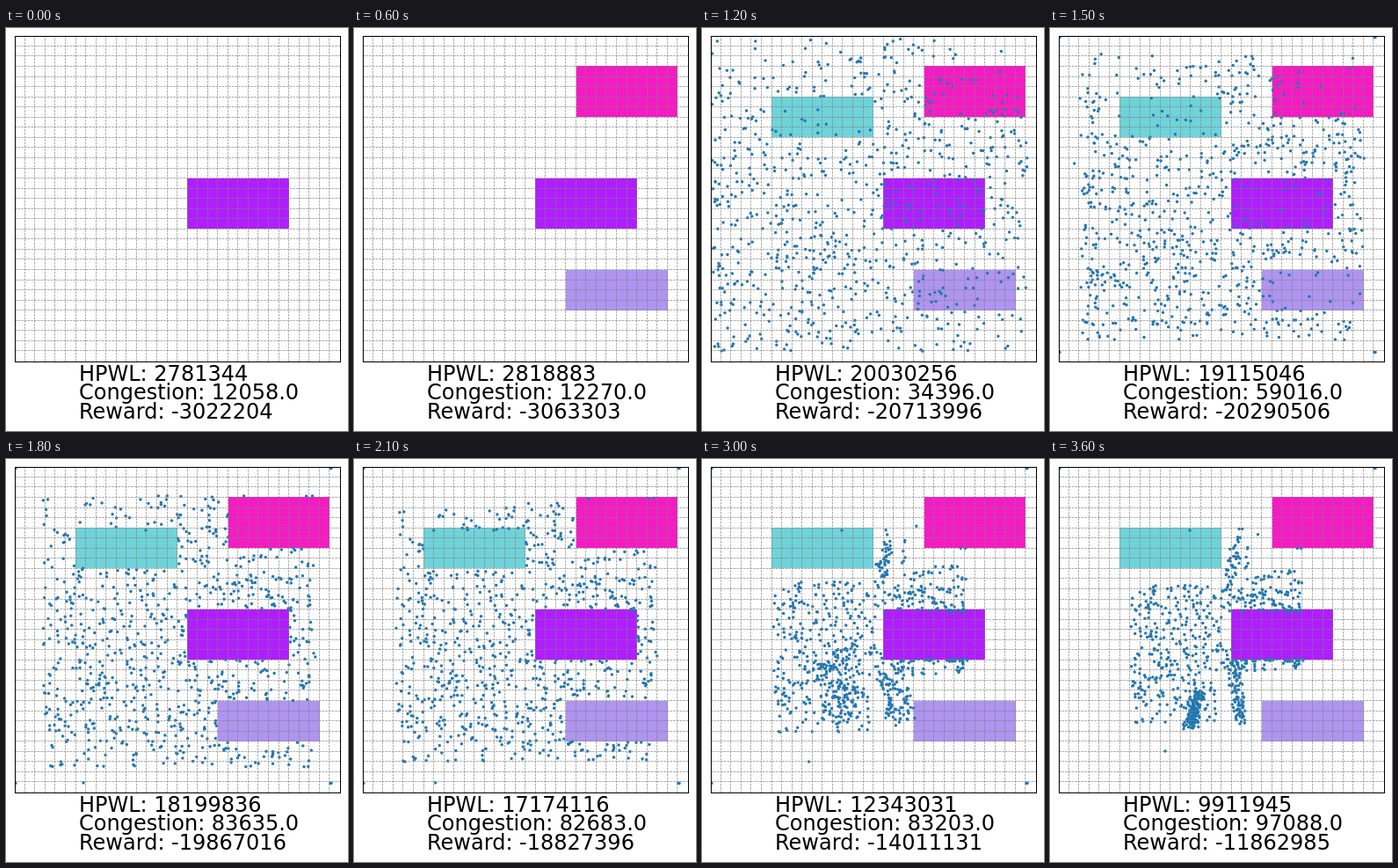
These frames come from a looping animation (389x458 px, 3.9 s). An HTML page:

```html
<!DOCTYPE html>
<html lang="en">
<head>
<meta charset="utf-8">
<title>Chip placement</title>
<style>
  html, body { margin: 0; width: 100%; height: 100%; overflow: hidden; background: #fff; }
  svg { display: block; }
  text { font: 24px "DejaVu Sans", Verdana, sans-serif; white-space: pre; }
</style>
</head>
<body>
<svg width="389" height="458" viewBox="0 0 389 458">
  <clipPath id="area"><rect x="10" y="9" width="371" height="371"/></clipPath>
  <g id="macros" shape-rendering="crispEdges"></g>
  <path id="cells" fill="none" stroke="#1f77b4" stroke-width="3.5" stroke-linecap="round" clip-path="url(#area)"/>
  <path id="grid" fill="none" stroke="#808080" stroke-width=".69" stroke-dasharray="2.57 1.11"/>
  <rect x="10.5" y="9.5" width="370" height="370" fill="none" stroke="#000"/>
  <text x="83" y="401"></text>
  <text x="83" y="422"></text>
  <text x="83" y="444"></text>
</svg>
<script>
const STEP = 300;
const STEPS = 13;
const PITCH = 11.552;
const mix = (a, b, t) => a + (b - a) * t;
const colX = i => Math.round(10.1 + i * PITCH);
const rowY = i => Math.round(8.84 + i * PITCH);

// HPWL, congestion, reward at every second step; steps between take the mean
const stats = [
  [2781344, 12058, -3022204],
  [2818883, 12270, -3063303],
  [20030256, 34396, -20713996],
  [18199836, 83635, -19867016],
  [16148396, 81731, -17787777],
  [12343031, 83203, -14011131],
  [9911945, 97088, -11862985]
];
function statsAt(step) {
  const a = stats[Math.floor(step / 2)], b = stats[Math.ceil(step / 2)];
  return a.map((v, i) => Math.round((v + b[i]) / 2));
}

// Column, row and height in grid units; listed in order of placement
const macros = [
  [17, 14, 5, '#b01eff'],
  [20, 23, 4, '#af94f0'],
  [21, 3, 5, '#f41bc3'],
  [6, 6, 4, '#6fd3d9']
].map(([c, r, h, fill]) => ({
  x0: colX(c), y0: rowY(r), x1: colX(c + 10), y1: rowY(r + h), fill
}));
const macroAt = (x, y) =>
  macros.find(m => x > m.x0 && x < m.x1 && y > m.y0 && y < m.y1);

// Dense streaks in which part of the cells end up
const corner = { x: 164, y: 285, rx: 12, ry: 22, slant: 8 };
const upper = { x: 209, y: 115, rx: 9, ry: 36, slant: 16 };
const lower = { x: 212, y: 264, rx: 9, ry: 37, slant: -8 };

let seed = 20417;
function rnd() {
  seed = seed + 0x6D2B79F5 | 0;
  let t = Math.imul(seed ^ seed >>> 15, 1 | seed);
  t = t + Math.imul(t ^ t >>> 7, 61 | t) ^ t;
  return ((t ^ t >>> 14) >>> 0) / 4294967296;
}
const spread = r => (rnd() * 2 - 1) * r;

// The cloud of cells shrinks as w goes from 0 to 1
const cloud = (u, v, w) => [
  mix(mix(42, 92, w), mix(352, 288, w), u),
  mix(mix(41, 85, w), mix(350, 300, w), v)
];

function pickStreak(x, y) {
  if (x > 195 && x < 245 && y < 130) return upper;
  if (x > 195 && y > 265) return lower;
  if (y < 125 && x < 245 || x < 245 && y > 170 && rnd() < .2) return corner;
}

function makeCell() {
  let u, v, x, y;
  do {
    u = rnd();
    v = rnd();
    [x, y] = cloud(u, v, 0);
  } while (macroAt(x, y));
  const s = pickStreak(x, y);
  const dy = spread(1);
  const goal = s && [
    s.x + (spread(s.rx) + spread(s.rx)) / 2 - s.slant * dy / 2,
    s.y + s.ry * dy
  ];
  const jitter = Array.from({ length: 4 }, () => spread(60));
  return { u, v, goal, jitter, inset: rnd() * 3 };
}
const cells = Array.from({ length: 800 }, makeCell);

// Move a point that lies inside a macro to its nearest edge
function pushOut([x, y], inset) {
  const m = macroAt(x, y);
  if (!m) return [x, y];
  const gaps = [x - m.x0, m.x1 - x, y - m.y0, m.y1 - y];
  return [
    [m.x0 + inset - 2, y], [m.x1 - inset + 2, y],
    [x, m.y0 + inset], [x, m.y1 - inset + 2]
  ][gaps.indexOf(Math.min(...gaps))];
}

function reflect(p, lo, hi) {
  if (p < lo) return 2 * lo - p;
  return p > hi ? 2 * hi - p : p;
}

const blend = (a, b, t) => a.map((v, i) => mix(v, b[i], t));

// Ease of the contraction, which lasts from step 6 to step 12
function settle(step) {
  const t = ((step - 6) / 6) ** .88;
  return t * t * (3 - 2 * t);
}

function position(c, step) {
  if (step < 5) {
    const [dx, dy] = c.jitter.slice(step === 3 ? 2 : 0);
    return [
      reflect(mix(11, 370, c.u) + dx, 11, 370),
      reflect(mix(10, 368, c.v) + dy, 10, 368)
    ];
  }
  if (step === 5) return blend(position(c, 4), position(c, 6), .5);
  const w = settle(step);
  const p = cloud(c.u, c.v, w);
  return pushOut(c.goal ? blend(p, c.goal, w ** 1.5) : p, c.inset);
}

const dot = ([x, y]) => `M${x.toFixed(1)} ${y.toFixed(1)}h0`;

function cellPath(step) {
  if (step < 3) return '';
  const points = cells.map(c => position(c, step));
  if (step > 4) {
    for (const y of step < 12 ? [10.5, 368.5] : [10.5]) {
      points.push([11, y], [369, y], [370, y]);
    }
  }
  if (step > 5) {
    const w = settle(step);
    points.push([mix(88, 131, w), Math.min(368, mix(388, 332, w))], [159, 81]);
  }
  return points.map(dot).join('');
}
const paths = Array.from({ length: STEPS }, (_, i) => cellPath(i));

const $ = id => document.getElementById(id);
const rects = macros.map(m => {
  const r = document.createElementNS('http://www.w3.org/2000/svg', 'rect');
  const attrs = { x: m.x0, y: m.y0, width: m.x1 - m.x0, height: m.y1 - m.y0, fill: m.fill };
  for (const k in attrs) r.setAttribute(k, attrs[k]);
  return $('macros').appendChild(r);
});

let lines = '';
for (let i = 1; i < 32; i++) {
  const x = Math.floor(9.74 + i * PITCH) + .5;
  const y = Math.floor(8.84 + i * PITCH) + .5;
  lines += `M${x} 379V10M10 ${y}H380`;
}
$('grid').setAttribute('d', lines);

const labels = document.querySelectorAll('text');
function draw(step) {
  const [hpwl, congestion, reward] = statsAt(step);
  rects.forEach((r, i) => r.setAttribute('visibility', i <= step ? 'visible' : 'hidden'));
  $('cells').setAttribute('d', paths[step]);
  labels[0].textContent = `HPWL: ${hpwl}`;
  labels[1].textContent = `Congestion: ${congestion.toFixed(1)}`;
  labels[2].textContent = `Reward: ${reward}`;
}

const start = performance.now();
let shown = -1;
function tick() {
  const step = Math.floor((performance.now() - start) / STEP) % STEPS;
  if (step !== shown) draw(shown = step);
  requestAnimationFrame(tick);
}
tick();
</script>
</body>
</html>
```
